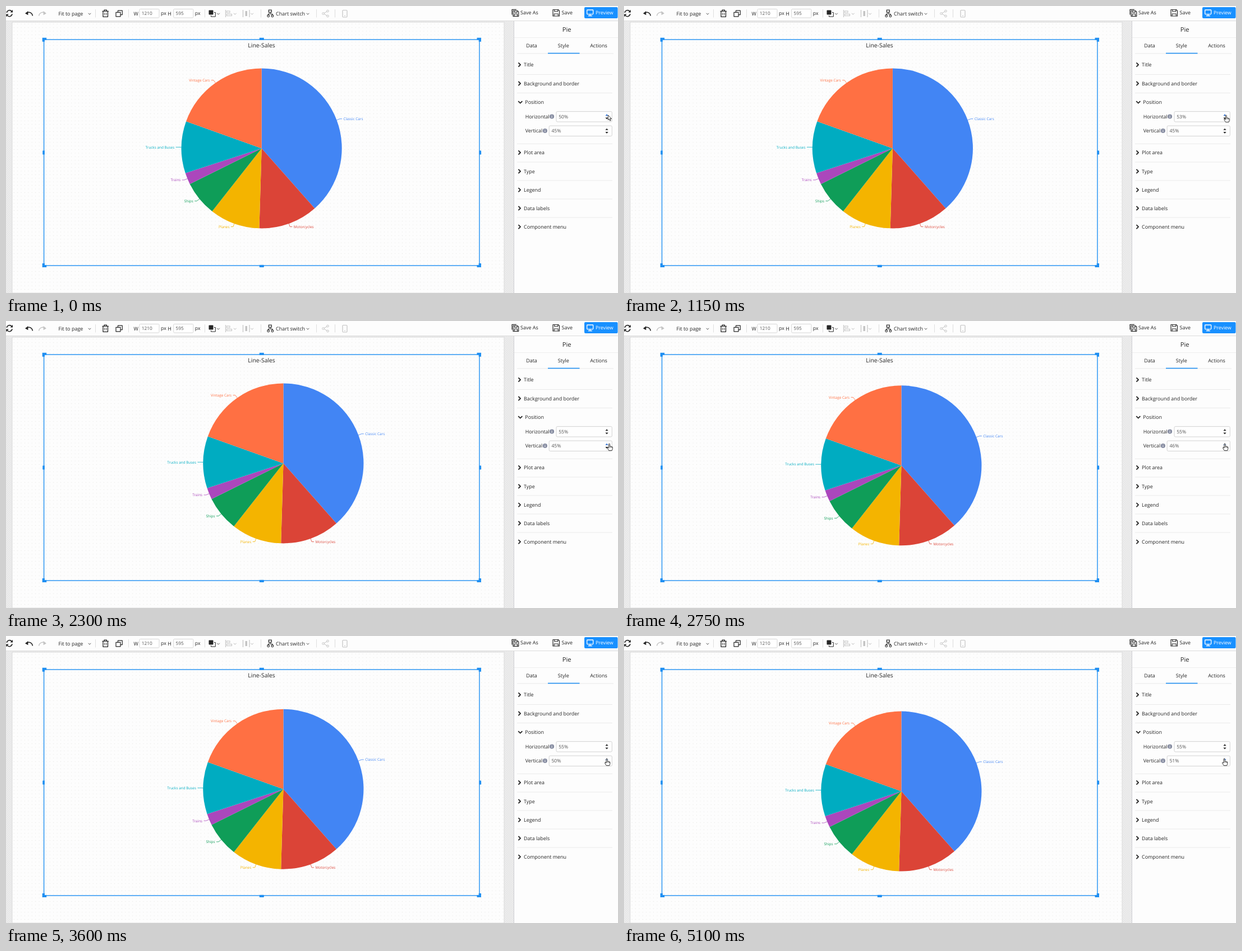
An HTML page for the animation above (5150 ms loop, 1091x513 px).

```html
<!DOCTYPE html>
<html lang="en">
<head>
<meta charset="utf-8">
<title>Pie position</title>
<style>
html, body { margin: 0; width: 100%; height: 100%; overflow: hidden; background: #fdfdfd; }
svg { display: block; width: 100%; height: 100%; }
text { font-family: "Open Sans", "Noto Sans", sans-serif; text-rendering: geometricPrecision; }
</style>
</head>
<body>
<svg id="stage" viewBox="0 0 1091 513">
  <defs>
    <pattern id="dots" x="11" y="29" width="6.41" height="6.41" patternUnits="userSpaceOnUse">
      <rect x="2.7" y="2.7" width="1" height="1" fill="#e3e3df"/>
    </pattern>
    <pattern id="weave" width="4" height="4" patternUnits="userSpaceOnUse">
      <rect width="4" height="4" fill="#ebebeb"/>
      <rect width="1" height="1" fill="#e0e0e2"/><rect x="2" y="2" width="1" height="1" fill="#e0e0e2"/>
    </pattern>
  </defs>
</svg>
<script>
const NS = 'http://www.w3.org/2000/svg';
const LOOP = 5150;
const stage = document.getElementById('stage');
const INK = '#262626', GREY = '#c4c4c4', BLUE = '#1f8ff2';

function add(tag, attrs, parent = stage) {
  const el = document.createElementNS(NS, tag);
  for (const key in attrs) el.setAttribute(key, attrs[key]);
  parent.appendChild(el);
  return el;
}
const rect = (x, y, width, height, fill, more, parent) =>
  add('rect', { x, y, width, height, fill, ...more }, parent);
const line = (d, stroke = INK, width = 1, parent = stage) =>
  add('path', { d, stroke, fill: 'none', 'stroke-width': width, 'stroke-linejoin': 'round' }, parent);
const shape = (d, fill = INK, parent = stage) => add('path', { d, fill }, parent);
const circle = (cx, cy, r, fill, more) => add('circle', { cx, cy, r, fill, ...more });

// Text placed by the middle of its capitals.
function label(x, mid, string, size = 8.95, fill = INK, anchor = 'start', parent = stage) {
  const el = add('text', { x, y: mid + size * 0.357, 'font-size': size, fill, 'text-anchor': anchor }, parent);
  el.textContent = string;
  return el;
}
const chevron = (x, y, colour = '#555') => line(`M${x - 2.3} ${y - 1.2}l2.3 2.4 2.3-2.4`, colour, 1);

function drawCanvas() {
  rect(0, 27, 906, 486, 'url(#weave)');
  rect(11, 29, 877, 484, '#fdfdfd', { stroke: '#d4d4d4', 'stroke-width': 0.8 });
  rect(11.5, 29.5, 876, 484, 'url(#dots)');
}

function drawToolbar() {
  rect(0, 0, 1091, 26.5, '#fdfdfd');
  line('M0 26.5H1091', '#dcdcdc', 1);

  line('M1.4 12A5 5 0 0 1 10.3 9.6M11 14.2A5 5 0 0 1 2 16.6', INK, 1.5);
  shape('M12 6.8V11.6H7.6ZM.3 19.4V14.6H4.8Z');
  const back = 'M36 13C40 9.8 46 11 47.5 17.5';
  line(back, INK, 1.6);
  shape('M34 13.2L39.4 9V16.2Z');
  line('M70 13C66 9.8 60 11 58.5 17.5', GREY, 1.4);
  shape('M72 13.2L66.6 9V16.2Z', GREY);

  label(93.5, 13.3, 'Fit to page', 9);
  chevron(149, 14);
  for (const x of [159.5, 218.5, 354.5, 454.5, 553.5, 586.5]) line(`M${x} 6V20.5`, '#dedede', 1);

  line('M171.5 9.3H183M175 9V7.2H179.5V9M173 9.5V19.3H181.5V9.5', INK, 1.3);
  line('M175.8 12V16.5M178.8 12V16.5', INK, 0.9);
  line('M199.5 11V8.2H207.3V15.6H204.3M196 11.3H204V18.8H196Z', INK, 1.2);

  const size = (x, name, value) => {
    label(x, 13.3, name, 9);
    rect(x + 10.5, 5.5, 35, 15.5, '#fff', { stroke: '#d2d2d2', 'stroke-width': 0.9, rx: 1.5 });
    label(x + 14.3, 13.3, value, 8.3, '#555');
    label(x + 48.5, 13.3, 'px', 8.7);
  };
  size(227.5, 'W', '1210');
  size(287.5 + 0.8, 'H', '595');

  rect(361.5, 7.5, 8, 8, INK, { rx: 1 });
  line('M371 11.5H373.3V19H365.5V17', INK, 1);
  chevron(378.5, 14);
  line('M391.5 7V20', GREY, 1.2);
  rect(393.5, 9, 5.5, 3, 'none', { stroke: GREY });
  rect(393.5, 14.5, 9, 3, 'none', { stroke: GREY });
  chevron(408.3, 14, '#bbb');
  line('M422.5 7V20M434 7V20', GREY, 1.2);
  rect(426.5, 9, 3.5, 9, GREY);
  chevron(438.6, 14, '#bbb');

  line('M471 11V14M467.5 17V14H474.8V17', INK, 1);
  rect(468.3, 7.2, 5, 4, 'none', { stroke: INK, 'stroke-width': 1.2 });
  circle(467.7, 17.8, 1.9, 'none', { stroke: INK, 'stroke-width': 1.1 });
  circle(474.9, 17.8, 1.9, 'none', { stroke: INK, 'stroke-width': 1.1 });
  label(481, 13.3, 'Chart switch', 9);
  chevron(538, 14);

  line('M573.5 9.2L565.5 13.5 573.5 17.8', GREY, 1);
  for (const [x, y] of [[573.5, 9], [565.5, 13.5], [573.5, 18]])
    circle(x, y, 1.8, '#fdfdfd', { stroke: GREY });
  rect(600, 7.5, 8, 12.5, 'none', { stroke: GREY, 'stroke-width': 1.2, rx: 1.2 });
  line('M603 17.5H605', GREY, 1);

  const disk = (x, y, s) => {
    line(`M${x} ${y}h${s - 2}l2 2v${s - 2}h${-s}z`, INK, 1.2);
    line(`M${x + 2.7} ${y}v3.2h${s - 5.5}v-3.2M${x + 2.2} ${y + s}v-4h${s - 4.4}v4`, INK, 1.1);
  };
  line('M902 15.5V6.3H910', INK, 1.2);
  disk(904, 8.5, 9.8);
  label(917, 12, 'Save As', 9);
  disk(975, 6.5, 11.5);
  label(990.5, 12, 'Save', 9);

  rect(1031, 2, 59.5, 20, '#1890ff', { rx: 2 });
  rect(1035.7, 7, 11, 7.6, 'none', { stroke: '#fff', 'stroke-width': 1.3, rx: 0.8 });
  line('M1041.2 14.5V17.3M1037.8 17.5H1044.8', '#fff', 1.3);
  label(1051, 12, 'Preview', 8.8, '#fff');
}

function drawSelection() {
  rect(67.6, 60, 776.4, 404, 'none', { stroke: BLUE, 'stroke-width': 1.4 });
  for (const [x, y, sx, sy] of [[64.7, 56.8, 1, 1], [847, 56.8, -1, 1], [64.7, 467, 1, -1], [847, 467, -1, -1]])
    shape(`M${x} ${y}h${7.5 * sx}v${4 * sy}h${-3.2 * sx}v${3 * sy}h${-4.3 * sx}z`, BLUE);
  for (const y of [56.8, 462.8]) rect(451.8, y, 8, 4.2, BLUE);
  for (const x of [65.3, 843.5]) rect(x, 258.5, 3.6, 7, BLUE);
  label(455.6, 70.5, 'Line-Sales', 10.4, INK, 'middle');
}

// Slices run clockwise from twelve o'clock; each ends at the given angle.
const slices = [
  ['Classic Cars', 138.6, '#4285f4'], ['Motorcycles', 181.7, '#db4437'],
  ['Planes', 218.1, '#f4b400'], ['Ships', 243.5, '#0f9d58'],
  ['Trains', 251.9, '#ab47bc'], ['Trucks and Buses', 289.7, '#00acc1'],
  ['Vintage Cars', 360, '#ff7043'],
];

function drawPie() {
  const R = 143, pie = add('g', {});
  const at = (deg, r) => {
    const a = deg * Math.PI / 180;
    return [r * Math.sin(a), -r * Math.cos(a)];
  };
  let start = 0;
  for (const [name, end, colour] of slices) {
    const mid = (start + end) / 2, side = mid < 180 ? 1 : -1;
    const [x, y] = at(mid, R + 6);
    shape(`M0 0L${at(start, R)}A${R} ${R} 0 ${end - start > 180 ? 1 : 0} 1 ${at(end, R)}Z`, colour, pie);
    line(`M${at(mid, R)}L${x} ${y}h${4 * side}`, colour, 0.8, pie);
    label(x + 6.5 * side, y, name, 6.4, colour, side > 0 ? 'start' : 'end', pie);
    start = end;
  }
  return pie;
}

function numberField(name, x, y, labelWidth) {
  label(925.7, y, name, 8.9);
  const info = 925.7 + labelWidth + 4;
  circle(info, y - 0.2, 4, '#858ba0');
  line(`M${info} ${y - 0.8}v2.8M${info} ${y - 2.7}v1`, '#fff', 1.1);
  rect(x, y - 9.2, 1080.3 - x, 18.4, '#fefefe', { stroke: '#cfcfcf', 'stroke-width': 0.9, rx: 2 });
  const value = label(x + 4.2, y, '', 8.6, '#555');
  const up = shape(`M1068.4 ${y - 1.6}l2.6-3 2.6 3z`);
  const down = shape(`M1068.4 ${y + 1.6}l2.6 3 2.6-3z`);
  return { value, up, down };
}

function drawPanel() {
  rect(905.5, 27, 186, 486, '#fdfdfd');
  line('M905.5 27V513', '#cfcfd3', 1);
  label(999.7, 42.5, 'Pie', 11.2, INK, 'middle');
  line('M906 56.5H1091', '#ededed', 0.8);
  label(937, 70.5, 'Data', 9, INK, 'middle');
  label(993.8, 70.5, 'Style', 9, INK, 'middle');
  label(1056.5, 70.5, 'Actions', 9, INK, 'middle');
  line('M911 85H1083', '#e4e4e4', 0.8);
  rect(966, 83.7, 56.5, 1.6, BLUE);

  const rows = { 'Title': 105, 'Background and border': 138.5, 'Plot area': 262, 'Type': 295.5,
    'Legend': 328.7, 'Data labels': 361.5, 'Component menu': 394.7 };
  for (const name in rows) {
    const y = rows[name];
    line(`M913.4 ${y - 3.6}l3.7 3.6-3.7 3.6`, INK, 1.8);
    label(923, y, name);
  }
  line('M913.2 170.2l3.6 3.5 3.6-3.5', INK, 1.8);
  label(925.3, 172, 'Position');
  for (const y of [122.5, 155.5, 246.3, 279, 312, 345, 378]) line(`M911 ${y}H1081`, '#e6e6e6', 0.8);
}

drawCanvas();
drawToolbar();
drawSelection();
const pie = drawPie();
drawPanel();
const across = numberField('Horizontal', 981, 197.8, 43.4);
const down = numberField('Vertical', 968.2, 223.3, 31.2);

function cursor(d, detail) {
  const g = add('g', {});
  add('path', { d, fill: '#fff', stroke: '#222', 'stroke-width': 0.9, 'stroke-linejoin': 'round' }, g);
  if (detail) line(detail, '#222', 0.7, g);
  return g;
}
const arrow = cursor('M0 0V8.8L2 7L3.4 10.2L4.9 9.5L3.5 6.5H6.2Z');
const hand = cursor(
  'M-1 .8Q0-.6 1 .8V5Q2.2 4.2 2.8 5.3Q4 4.7 4.5 5.8Q5.8 5.4 5.8 7V9.2L4.7 12.6H-.8L-3.4 8.2Q-3.6 6.6-2.2 7L-1 8.2Z',
  'M1 5V7.5M2.8 5.3V7.6M4.5 5.8V7.8');

const acrossClicks = [650, 850, 1050, 1300, 1500];
const downClicks = [2500, 2900, 3100, 3300, 3500, 3800];
const path = [[0, 1073.3, 195], [1700, 1073.3, 195], [1800, 1073.5, 207], [2000, 1079, 219.5],
  [2250, 1077, 219], [2450, 1071, 219], [3950, 1071, 219], [4150, 1074, 219], [4400, 1070, 219], [LOOP, 1070, 219]];

const count = (clicks, t) => clicks.filter(c => t >= c).length;

function pointer(t) {
  const i = path.findIndex(p => p[0] > t);
  const [t0, x0, y0] = path[i - 1], [t1, x1, y1] = path[i];
  const k = (t - t0) / (t1 - t0);
  return [x0 + (x1 - x0) * k, y0 + (y1 - y0) * k];
}

function render(t) {
  const h = 50 + count(acrossClicks, t), v = 45 + count(downClicks, t);
  pie.setAttribute('transform', `translate(${455.7 + (h - 50) * 7.75} ${254.4 + (v - 45) * 3.86})`);
  across.value.textContent = h + '%';
  down.value.textContent = v + '%';

  const [x, y] = pointer(t);
  const hot = y < 199 ? across.up : y < 212 ? across.down : t > 2250 ? down.up : null;
  for (const el of [across.up, across.down, down.up, down.down])
    el.setAttribute('fill', el === hot ? '#2f6fd0' : INK);

  const pointing = t >= 300;
  arrow.setAttribute('visibility', pointing ? 'hidden' : 'visible');
  hand.setAttribute('visibility', pointing ? 'visible' : 'hidden');
  (pointing ? hand : arrow).setAttribute('transform', `translate(${x} ${y})`);
}

const begin = performance.now();
function tick() {
  render((performance.now() - begin) % LOOP);
  requestAnimationFrame(tick);
}
tick();
</script>
</body>
</html>
```
